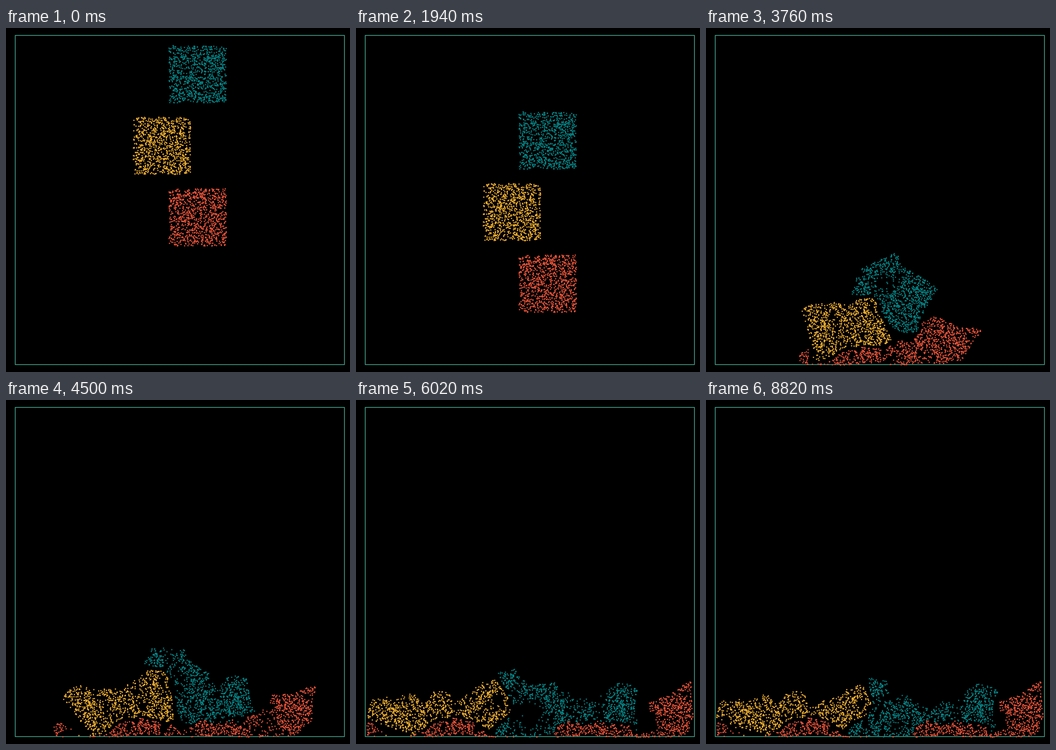
Animation, 748 px wide and 748 px high, one loop 8840 ms. Source, as an HTML page with a canvas:

```html
<!DOCTYPE html>
<html lang="en">
<head>
<meta charset="utf-8">
<title>Falling snow blocks</title>
<style>
  html, body { margin: 0; width: 100%; height: 100%; overflow: hidden; background: #000; }
  canvas { display: block; }
</style>
</head>
<body>
<canvas id="stage" width="748" height="748"></canvas>
<script>
// Material point method (MLS-MPM) with snow plasticity.
const ctx = document.getElementById('stage').getContext('2d');

const FRAMES = 190, LOOP = 8840, STEPS = 10;
const N = 80, ROW = N + 1, DT = 1e-4, GRAVITY = 200, WALL = 0.05;
const YOUNG = 1e4, POISSON = 0.2, HARDENING = 10;
const MU = YOUNG / (2 * (1 + POISSON));
const LAMBDA = YOUNG * POISSON / ((1 + POISSON) * (1 - 2 * POISSON));

const SCALE = 778, LEFT = -11, TOP = -15, DOT = 2.5;
const HALF = 0.08, PER_BLOCK = 1000;
const blocks = [
  { x: 0.55, y: 0.45, color: '#ed553b' },
  { x: 0.45, y: 0.65, color: '#f2b134' },
  { x: 0.55, y: 0.85, color: '#068587' }
];
const COUNT = blocks.length * PER_BLOCK;

let seed = 20181;
function random() {
  seed = (seed + 0x6D2B79F5) | 0;
  let t = Math.imul(seed ^ (seed >>> 15), 1 | seed);
  t = (t + Math.imul(t ^ (t >>> 7), 61 | t)) ^ t;
  return ((t ^ (t >>> 14)) >>> 0) / 4294967296;
}

const clamp = (v, lo, hi) => v < lo ? lo : v > hi ? hi : v;
const field = (size, value = 0) => new Float64Array(size).fill(value);

const px = field(COUNT), py = field(COUNT), vx = field(COUNT), vy = field(COUNT);
const f00 = field(COUNT, 1), f01 = field(COUNT), f10 = field(COUNT), f11 = field(COUNT, 1);
const c00 = field(COUNT), c01 = field(COUNT), c10 = field(COUNT), c11 = field(COUNT);
const jp = field(COUNT, 1);
const gx = field(ROW * ROW), gy = field(ROW * ROW), gm = field(ROW * ROW);
const wx = field(3), wy = field(3);

blocks.forEach((b, k) => {
  for (let p = k * PER_BLOCK; p < (k + 1) * PER_BLOCK; p++) {
    px[p] = b.x + (random() * 2 - 1) * HALF;
    py[p] = b.y + (random() * 2 - 1) * HALF;
  }
});

// Quadratic B-spline weights
function weights(w, f) {
  w[0] = 0.5 * (1.5 - f) * (1.5 - f);
  w[1] = 0.75 - (f - 1) * (f - 1);
  w[2] = 0.5 * (f - 0.5) * (f - 0.5);
}

function particlesToGrid() {
  gx.fill(0);
  gy.fill(0);
  gm.fill(0);
  const k = -4 * N * N * DT;
  for (let p = 0; p < COUNT; p++) {
    const X = px[p] * N, Y = py[p] * N;
    const bx = (X - 0.5) | 0, by = (Y - 0.5) | 0;
    const fx = X - bx, fy = Y - by;
    weights(wx, fx);
    weights(wy, fy);

    const a = f00[p], b = f01[p], c = f10[p], d = f11[p];
    const len = Math.sqrt((a + d) * (a + d) + (c - b) * (c - b)) || 1;
    const cos = (a + d) / len, sin = (c - b) / len;
    const J = a * d - b * c;
    const e = Math.exp(HARDENING * (1 - jp[p]));
    const m2 = 2 * MU * e, vol = LAMBDA * e * (J - 1) * J;
    const ea = a - cos, eb = b + sin, ec = c - sin, ed = d - cos;

    const a00 = k * (m2 * (ea * a + eb * b) + vol) + c00[p];
    const a01 = k * m2 * (ea * c + eb * d) + c01[p];
    const a10 = k * m2 * (ec * a + ed * b) + c10[p];
    const a11 = k * (m2 * (ec * c + ed * d) + vol) + c11[p];

    for (let i = 0; i < 3; i++) {
      const dx = (i - fx) / N;
      for (let j = 0; j < 3; j++) {
        const dy = (j - fy) / N, w = wx[i] * wy[j];
        const g = (bx + i) * ROW + by + j;
        gx[g] += w * (vx[p] + a00 * dx + a01 * dy);
        gy[g] += w * (vy[p] + a10 * dx + a11 * dy);
        gm[g] += w;
      }
    }
  }
}

// Sticky sides and ceiling, slippery floor
function updateGrid() {
  for (let i = 0; i <= N; i++) {
    for (let j = 0; j <= N; j++) {
      const g = i * ROW + j;
      if (gm[g] <= 0) continue;
      const x = i / N, y = j / N;
      gx[g] /= gm[g];
      gy[g] = gy[g] / gm[g] - GRAVITY * DT;
      if (x < WALL || x > 1 - WALL || y > 1 - WALL) gx[g] = gy[g] = 0;
      if (y < WALL && gy[g] < 0) gy[g] = 0;
    }
  }
}

function deform(p) {
  const s00 = 1 + DT * c00[p], s01 = DT * c01[p];
  const s10 = DT * c10[p], s11 = 1 + DT * c11[p];
  const a = s00 * f00[p] + s01 * f10[p], b = s00 * f01[p] + s01 * f11[p];
  const c = s10 * f00[p] + s11 * f10[p], d = s10 * f01[p] + s11 * f11[p];

  // Split into rotation and stretch, then limit the stretch
  const len = Math.sqrt((a + d) * (a + d) + (c - b) * (c - b)) || 1;
  const cos = (a + d) / len, sin = (c - b) / len;
  const p0 = cos * a + sin * c, q = cos * b + sin * d, p1 = cos * d - sin * b;
  const mid = (p0 + p1) / 2, diff = (p0 - p1) / 2;
  const h = Math.sqrt(diff * diff + q * q);
  const hi = clamp(mid + h, 0.975, 1.0075), lo = clamp(mid - h, 0.975, 1.0075);
  const m = (hi + lo) / 2, r = h > 1e-14 ? (hi - lo) / 2 / h : 0;
  const t0 = m + r * diff, t1 = m - r * diff, u = r * q;

  f00[p] = cos * t0 - sin * u;
  f01[p] = cos * u - sin * t1;
  f10[p] = sin * t0 + cos * u;
  f11[p] = sin * u + cos * t1;
  jp[p] = clamp(jp[p] * (a * d - b * c) / (hi * lo), 0.6, 20);
}

function gridToParticles() {
  for (let p = 0; p < COUNT; p++) {
    const X = px[p] * N, Y = py[p] * N;
    const bx = (X - 0.5) | 0, by = (Y - 0.5) | 0;
    const fx = X - bx, fy = Y - by;
    weights(wx, fx);
    weights(wy, fy);
    let u = 0, v = 0, ux = 0, uy = 0, vX = 0, vY = 0;
    for (let i = 0; i < 3; i++) {
      for (let j = 0; j < 3; j++) {
        const g = (bx + i) * ROW + by + j, w = wx[i] * wy[j];
        const gu = w * gx[g], gv = w * gy[g];
        u += gu;
        v += gv;
        ux += gu * (i - fx);
        uy += gu * (j - fy);
        vX += gv * (i - fx);
        vY += gv * (j - fy);
      }
    }
    vx[p] = u;
    vy[p] = v;
    c00[p] = 4 * N * ux;
    c01[p] = 4 * N * uy;
    c10[p] = 4 * N * vX;
    c11[p] = 4 * N * vY;
    px[p] += DT * u;
    py[p] += DT * v;
    deform(p);
  }
}

// Every picture is computed once and kept for later loops.
const history = [];
let stepsDone = 0;

function addPicture() {
  const n = history.length;
  const goal = STEPS * (n + Math.ceil(n / 32));
  for (; stepsDone < goal; stepsDone++) {
    particlesToGrid();
    updateGrid();
    gridToParticles();
  }
  const shot = new Float32Array(COUNT * 2);
  for (let p = 0; p < COUNT; p++) {
    shot[2 * p] = px[p] * SCALE + LEFT - 1.4;
    shot[2 * p + 1] = (1 - py[p]) * SCALE + TOP - 2.4;
  }
  history.push(shot);
}

// Pictures last 20, 100 and 20 ms in turn.
function pictureAt(time) {
  const t = time % LOOP, r = t % 140;
  const n = 3 * Math.floor(t / 140) + (r < 20 ? 0 : r < 120 ? 1 : 2);
  return Math.min(n, FRAMES - 1);
}

function draw(n) {
  const shot = history[n];
  ctx.fillStyle = '#000';
  ctx.fillRect(0, 0, 748, 748);
  ctx.strokeStyle = '#4fb99f';
  ctx.lineWidth = 1.4;
  ctx.strokeRect(20.1, 16.1, 715.8, 715.8);
  blocks.forEach((b, k) => {
    ctx.fillStyle = b.color;
    for (let p = k * PER_BLOCK; p < (k + 1) * PER_BLOCK; p++) {
      ctx.fillRect(shot[2 * p], shot[2 * p + 1], DOT, DOT);
    }
  });
}

const start = performance.now();
let shown = -1;

function tick() {
  const n = pictureAt(Math.max(0, performance.now() - start));
  while (history.length <= n) addPicture();
  if (n !== shown) draw(shown = n);
  if (history.length < FRAMES) addPicture();
  requestAnimationFrame(tick);
}
tick();
</script>
</body>
</html>
```
